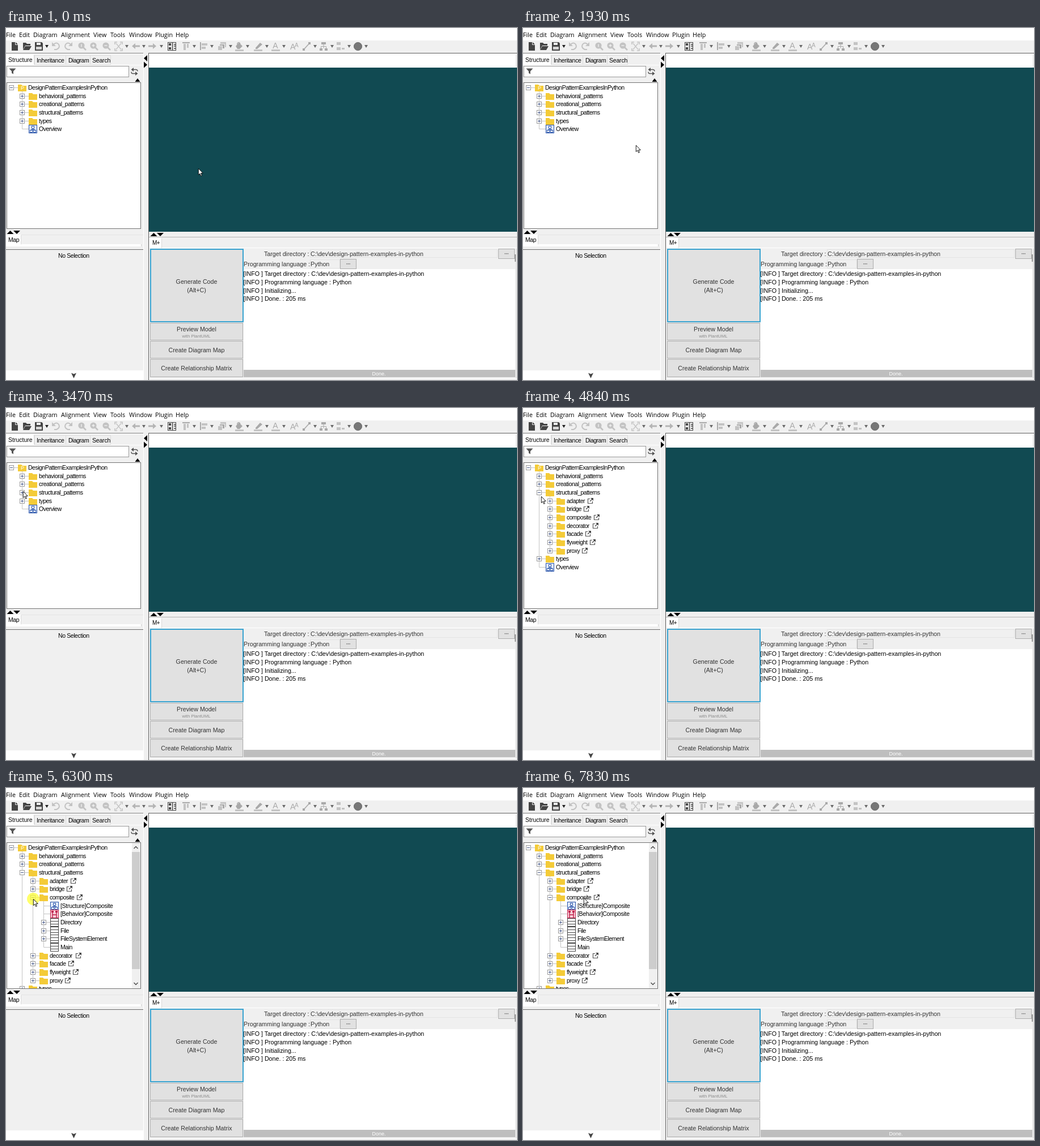
An HTML page for the animation above (8 s loop, 901x622 px).

```html
<!DOCTYPE html>
<html lang="en">
<head>
<meta charset="utf-8">
<title>Model browser</title>
<style>
  html, body { margin: 0; width: 100%; height: 100%; overflow: hidden; background: #f0f0f0; }
  svg { display: block; width: 901px; height: 622px; }
  text { font-family: "Liberation Sans", Arial, sans-serif; white-space: pre; }
  .menu { font-family: "Open Sans", "Noto Sans", sans-serif; }
</style>
</head>
<body>
<svg id="stage" viewBox="0 0 901 622" xmlns="http://www.w3.org/2000/svg"></svg>
<script>
const LOOP = 8000;
const ROW = 14.67;

// ---- drawing helpers: each returns SVG markup ----
const rect = (x, y, w, h, fill) => `<rect x="${x}" y="${y}" width="${w}" height="${h}" fill="${fill}"/>`;
const frame = (x, y, w, h, fill, edge) =>
  `<rect x="${x + .5}" y="${y + .5}" width="${w - 1}" height="${h - 1}" fill="${fill}" stroke="${edge}"/>`;
const shape = (d, fill) => `<path d="${d}" fill="${fill}"/>`;
const line = (d, color, w = 1) => `<path d="${d}" fill="none" stroke="${color}" stroke-width="${w}"/>`;
const disc = (x, y, r, fill) => `<circle cx="${x}" cy="${y}" r="${r}" fill="${fill}"/>`;
const ring = (x, y, r, color, w) =>
  `<circle cx="${x}" cy="${y}" r="${r}" fill="none" stroke="${color}" stroke-width="${w}"/>`;
const at = (x, y, body) => `<g transform="translate(${x} ${y})">${body}</g>`;

// y is the middle of the capitals
function label(x, y, s, { size = 10.5, gap = 0, fill = '#000', anchor = 'start', cls = '' } = {}) {
  return `<text x="${x}" y="${y + size * .355}" font-size="${size}" letter-spacing="${gap}"` +
    ` fill="${fill}" text-anchor="${anchor}" class="${cls}">${s}</text>`;
}
const caret = (x, y, fill = '#6a6a6a') => shape(`M${x - 3} ${y - 2.5}h6l-3 5z`, fill);
const upMark = (x, y, w = 6) => shape(`M${x - w} ${y + 3}h${2 * w}l${-w} -6z`, '#000');
const downMark = (x, y, w = 6) => shape(`M${x - w} ${y - 3}h${2 * w}l${-w} 6z`, '#000');

// ---- menu and toolbar ----
function menuBar() {
  const items = [[0, 'File'], [23, 'Edit'], [48, 'Diagram'], [97, 'Alignment'], [154, 'View'],
    [184, 'Tools'], [217, 'Window'], [263, 'Plugin'], [299, 'Help']];
  return rect(0, 0, 901, 22, '#fff') +
    items.map(([x, s]) => label(x, 11.7, s, { size: 10.75, cls: 'menu' })).join('');
}

function toolbar() {
  const dark = '#444', soft = '#c3c3c3', mid = '#a9a9a9', back = '#f0f0f0';
  const lens = (x, mark) => disc(x - 1, 31, 5.6, soft) + line(`M${x + 2.5} 34.5l4.5 4.5`, soft, 2.6) +
    line(mark, back, 1.4);
  const arrow = (x, s) => shape(`M${x - 7 * s} 32l${6 * s} -5v3.5h${8 * s}v3h${-8 * s}v3.5z`, '#b5b5b5');
  const turn = (x, s) => line(`M${x - 4 * s} 29q${5 * s} -5 ${9 * s} 0q${3 * s} 6 ${-4 * s} 9h${-4 * s}`, soft, 2) +
    shape(`M${x - 7 * s} 25v7h${7 * s}z`, soft);
  let s = rect(0, 22, 901, 22, back);
  s += shape('M10 25h7l4 4v11h-11z', dark) + line('M16.5 25v4.5h4.5', back);
  s += shape('M30 26h5l2 2h6v3h-9l-4 7z', dark) + shape('M34 32h11l-4 7h-11z', dark);
  s += shape('M51 25h12l2 2v13h-14z', dark) + rect(54, 26, 7, 4, back) + rect(53, 33, 10, 5, '#d5d5d5');
  s += turn(88, 1) + turn(110, -1);
  s += lens(134, 'M133 28.5v5') + lens(155, 'M151.5 31h5M154 28.5v5') + lens(177, 'M173.5 31h5');
  s += line('M192 29v-4h4M201 25h4v4M205 36v4h-4M196 40h-4v-4', soft, 1.6) +
    line('M194 27l9 11M203 27l-9 11', soft, 1.2);
  s += arrow(229, 1) + arrow(258, -1);
  s += frame(285, 25, 15, 15, back, dark) + rect(287, 27, 4, 4, dark) + rect(287, 34, 4, 4, dark) +
    line('M293.5 26v13M296 29h3M296 32h3M296 36h3', dark, 1.4);
  s += rect(311, 25, 13, 2, mid) + rect(313, 28, 4, 11, soft) + rect(319, 28, 3, 7, soft);
  s += rect(342, 25, 2, 14, mid) + rect(345, 27, 10, 4, soft) + rect(345, 33, 7, 4, soft);
  s += rect(378, 25, 10, 9, soft) + frame(376, 28, 10, 9, mid, back) + frame(373, 31, 9, 9, soft, back);
  s += shape('M405 32l6 -6l6 6l-5 5h-4z', mid) + line('M408 30v-3q3 -3 5 1', mid, 1.4) + rect(404, 38, 15, 3, soft);
  s += shape('M440 35l8 -9l4 3l-9 8h-3z', mid) + rect(437, 38, 15, 3, soft);
  s += label(475, 31, 'A', { size: 14, fill: mid, anchor: 'middle' }) + rect(468, 38, 15, 3, soft);
  s += label(501, 33, 'A', { size: 14, fill: mid }) + label(509, 30, 'A', { size: 10, fill: mid });
  s += line('M525 38l10 -11', mid, 1.6) + rect(523, 36, 4, 4, mid) + rect(533, 25, 4, 4, mid);
  s += rect(556, 25, 8, 4, mid) + line('M560 29v7M555.5 36v-3.5h9v3.5', mid) +
    rect(553, 36, 5, 4, mid) + rect(562, 36, 5, 4, mid);
  s += rect(583, 25, 7, 5, soft) + rect(583, 34, 7, 5, soft) + rect(592, 35, 5, 3, soft);
  s += disc(620.5, 32.5, 7, '#777') + ring(620.5, 32.5, 7, '#666', 1);
  s += caret(72, 32.5, '#222');
  for (const x of [213, 243, 274, 332, 363, 396, 426, 460, 490, 545, 575, 605, 635]) s += caret(x, 32.5);
  return s;
}

// ---- left side ----
function leftPane() {
  let s = rect(0, 44, 242, 1, '#808080') + rect(0, 45, 242, 1, '#fff');
  s += rect(0, 46, 50, 20, '#fff') + rect(49, 47, 1, 18, '#d9d9d9');
  s += frame(50, 48, 56, 17, '#f0f0f0', '#dcdcdc') + frame(105, 48, 44, 17, '#f0f0f0', '#dcdcdc') +
    frame(148, 48, 37, 17, '#f0f0f0', '#dcdcdc') + rect(50, 65, 192, 1, '#fff');
  s += label(4, 56, 'Structure') + label(54, 57, 'Inheritance', { gap: -.3 }) +
    label(110, 57, 'Diagram', { gap: -.5 }) + label(152, 57, 'Search', { gap: -.2 });
  s += frame(1, 67, 216, 20, '#fff', '#9a9a9a') + shape('M5.5 71.5h12l-4.5 5v5l-3 -2v-3z', '#555');
  s += line('M222 73.5h7M223 80.5h8', '#555', 1.6) + shape('M225 70v7l-4.5 -3.5zM228 77v7l4.5 -3.5z', '#555') +
    line('M229 73.5q3 0 3 3M223 80.5q-2 0 -2 -3', '#555', 1.4);
  s += upMark(232, 92, 4.5);
  s += frame(1, 96, 237, 259, '#fff', '#737373');
  s += upMark(7.5, 361) + downMark(19, 361);
  s += rect(0, 365, 26, 18, '#fff') + rect(26, 366, 1, 16, '#d9d9d9') + rect(27, 365, 215, 1, '#e4e4e4') +
    rect(27, 382, 212, 1, '#fff') + rect(0, 383, 239, 3, '#fff') + rect(238, 382, 1, 4, '#d0d0d0');
  s += label(4, 374, 'Map', { gap: -.4 });
  s += rect(0, 391, 242, 1, '#6b6b6b') + label(92, 402, 'No Selection', { gap: -.4 });
  s += rect(0, 605, 242, 17, '#fff') + shape('M115 609.5l4.5 2l4.5 -2l-4.5 9.5z', '#444');
  s += rect(242, 45, 1, 577, '#fff') + rect(243, 44, 8, 578, '#f0f0f0');
  s += shape('M249 48v11l-6 -5.5z', '#000') + shape('M243 59.5v11l6 -5.5z', '#000');
  return s;
}

// ---- right side ----
function rightPane() {
  const log = { size: 10.7 }, field = { size: 10.7, fill: '#333' };
  const caption = { size: 10.65, anchor: 'middle', fill: '#333' };
  const push = (y, h, s, dy = 0) => frame(254, y, 164, h, '#e1e1e1', '#adadad') +
    label(336, y + h / 2 + dy, s, caption);
  const dots = (x, y, w, h) => frame(x, y, w, h, '#e1e1e1', '#adadad') +
    [-2.5, 0, 2.5].map(d => rect(x + w / 2 + d - .6, y + h / 2 - .8, 1.2, 1.2, '#333')).join('');
  const folder = 'C:\\dev\\design-pattern-examples-in-python';
  let s = rect(251, 44, 650, 1, '#5f5f5f') + rect(251, 44, 1, 578, '#5f5f5f') + rect(252, 45, 649, 25, '#fff');
  s += rect(899, 46, 1, 24, '#ddd') + rect(252, 70, 649, 290, '#114a52');
  s += upMark(260.5, 365) + downMark(272, 365);
  s += rect(252, 369, 649, 1, '#b5b5b5') + rect(253, 370, 22, 19, '#fff') + rect(274, 371, 1, 18, '#d9d9d9') +
    rect(275, 388, 626, 1, '#fff') + label(258, 379, 'M+', { size: 10, gap: -.5 });
  s += rect(254, 390, 165, 130, '#38a3d0') + rect(256, 392, 161, 126, '#e1e1e1');
  s += label(336, 448, 'Generate Code', caption) + label(336, 463, '(Alt+C)', caption);
  s += push(521, 31, 'Preview Model', -4.5) +
    label(335.5, 544.5, 'with PlantUML', { size: 7.75, anchor: 'middle', fill: '#8c8c8c' });
  s += push(553, 31, 'Create Diagram Map', .5) + push(585, 32, 'Create Relationship Matrix', .5);
  s += frame(536, 391, 331, 15, '#f0f0f0', '#e3e3e3') + frame(536, 409, 53, 16, '#f0f0f0', '#e3e3e3');
  s += label(455, 399, 'Target directory :', field) + label(419, 417.5, 'Programming language :', field);
  s += label(537, 399, folder, field) + label(537, 417.5, 'Python', field);
  s += dots(868, 390, 29, 18) + dots(589, 408, 29, 18) + rect(897, 400, 2, 13, '#9c9c9c');
  s += rect(419, 426, 479, 178, '#fff');
  ['Target directory : ' + folder, 'Programming language : Python', 'Initializing...', 'Done. : 205 ms']
    .forEach((m, i) => s += label(418.5, 434.5 + i * ROW, '[INFO ] ' + m, log));
  s += rect(419, 604, 479, 13, '#bebebe') +
    label(657.5, 611, 'Done.', { size: 9, anchor: 'middle', fill: '#fff' });
  return s + rect(252, 619, 649, 1, '#fff') + rect(899, 390, 1, 229, '#dcdcdc');
}

// ---- tree ----
const blue = '#2450a8', red = '#c01f4a';
const icons = {
  root: x => icons.folder(x) + label(x + 8, 1, 'P', { size: 9, fill: '#fff', anchor: 'middle' }),
  folder: x => shape(`M${x} -5h6l2 2h7v10h-15z`, '#f4cb38'),
  blue: x => frame(x, -7, 15, 15, '#e6eefc', blue) + frame(x + 5, -5, 5, 5, '#fff', blue) +
    line(`M${x + 7.5} 0v2M${x + 4.5} 3v-1.5h6v1.5`, blue) +
    frame(x + 2, 2, 5, 5, '#fff', blue) + frame(x + 8, 2, 5, 5, '#fff', blue),
  red: x => frame(x, -7, 15, 15, '#f6cfd8', red) + rect(x + 2, -5, 4, 3, red) +
    rect(x + 9, -5, 4, 3, red) + line(`M${x + 4} -2v9M${x + 11} -2v9M${x + 4} 2h7`, red, 1.4),
  box: x => frame(x, -7, 15, 15, '#fff', '#444') + line(`M${x} -1.5h15M${x} 3.5h15`, '#444'),
};
const outLink = x => line(`M${x + 4} -3.5h-3.5v8h8v-3.5`, '#555', 1.2) +
  line(`M${x + 4} 1l4.5 -4.5`, '#444', 1.3) + shape(`M${x + 5} -5h5v5z`, '#444');

// [depth, text, icon, expander, link x]
const kid = (s, x, sign = '+') => [2, s, 'folder', sign, x];
const head = [[0, 'DesignPatternExamplesInPython', 'root', '-'], [1, 'behavioral_patterns', 'folder', '+'],
  [1, 'creational_patterns', 'folder', '+']];
const tail = [[1, 'types', 'folder', '+'], [1, 'Overview', 'blue', '']];
const group = sign => [1, 'structural_patterns', 'folder', sign];
const before = [kid('adapter', 114), kid('bridge', 107)];
const after = [kid('decorator', 123), kid('facade', 110), kid('flyweight', 118), kid('proxy', 104)];
const parts = [[3, '[Structure]Composite', 'blue', ''], [3, '[Behavior]Composite', 'red', ''],
  [3, 'Directory', 'box', '+'], [3, 'File', 'box', '+'], [3, 'FileSystemElement', 'box', '+'], [3, 'Main', 'box', '']];
const trees = [
  [...head, group('+'), ...tail],
  [...head, group('-'), ...before, kid('composite', 125), ...after, ...tail],
  [...head, group('-'), ...before, kid('composite', 125, '-'), ...parts, ...after, ...tail],
];

function tree(rows) {
  const guide = '#c4c4c4';
  let guides = '', s = '';
  rows.forEach(([depth, text, icon, sign, link], i) => {
    const x = Math.round(9 + depth * 18.9), y = Math.round(105 + i * ROW);
    if (depth) {
      let up = i - 1;
      while (rows[up][0] >= depth) up--;
      guides += line(`M${x + .5} ${Math.round(105 + up * ROW) + 7}V${y + .5}`, guide);
    }
    guides += line(`M${x + .5} ${y + .5}h12`, guide);
    let body = icons[icon](x + 12);
    if (sign) {
      body += frame(x - 4, -4, 9, 9, '#fff', '#9a9a9a') +
        line(`M${x - 2} .5h5` + (sign === '+' ? `M${x + .5} -2v5` : ''), '#4a5c8c');
    }
    body += label(x + 30, .3, text, { gap: text[0] === '[' ? -.3 : -.5 });
    if (link) body += outLink(link);
    s += at(0, y, body);
  });
  return guides + s;
}

const scrollBar = rect(222, 97, 15, 257, '#f0f0f0') + rect(222, 113, 14, 207, '#cdcdcd') +
  line('M225.5 107l3.5 -3.5l3.5 3.5M225.5 344l3.5 3.5l3.5 -3.5', '#505050', 1.5);

document.getElementById('stage').innerHTML =
  '<clipPath id="clip"><rect x="2" y="97" width="235" height="257"/></clipPath>' +
  rect(0, 0, 901, 622, '#f0f0f0') + menuBar() + toolbar() + leftPane() + rightPane() +
  trees.map((rows, i) => `<g class="tree" clip-path="url(#clip)">${tree(rows)}${i === 2 ? scrollBar : ''}</g>`).join('') +
  '<circle id="click" r="11" fill="#ffff30" opacity=".72"/>' +
  '<path id="pointer" d="M.3 .3V11.6L2.9 9.2L4.7 13.5L6.5 12.7L4.7 8.6H8.3Z"' +
  ' fill="#fff" stroke="#000" stroke-width=".9"/>';

// ---- motion ----
const path = [[0, 339, 248], [923, 339, 248], [1390, 302, 239], [1770, 227, 217], [2560, 93, 165],
  [2640, 78, 160], [3470, 30, 147], [4760, 30, 147], [4840, 32, 156], [5600, 45, 189], [5840, 48, 196],
  [6753, 48, 196], [7600, 105, 194], [7673, 105, 194], [7830, 107, 194], [LOOP, 107, 194]];
const starts = [1000, 4840, 6830, 7750];
const clicks = [[4030, 4130], [6300, 6370]];
const TICK = 77.2;

// the pointer is sampled on a coarse clock, restarted with each move
function sampled(t) {
  const s = starts.filter(v => v <= t).pop();
  return s === undefined ? 0 : Math.min(LOOP, s + Math.floor((t - s) / TICK + .15) * TICK);
}

function slope(i, k) {
  if (i === 0 || i === path.length - 1) return 0;
  const [a, b, c] = path.slice(i - 1, i + 2);
  const h0 = b[0] - a[0], h1 = c[0] - b[0];
  const d0 = (b[k] - a[k]) / h0, d1 = (c[k] - b[k]) / h1;
  return d0 * d1 <= 0 ? 0 : (d0 * h1 + d1 * h0) / (h0 + h1);
}

function along(t, k) {
  let i = 0;
  while (i < path.length - 2 && path[i + 1][0] <= t) i++;
  const a = path[i], b = path[i + 1], h = b[0] - a[0], u = (t - a[0]) / h, v = 1 - u;
  return Math.round(a[k] * (1 + 2 * u) * v * v + b[k] * u * u * (3 - 2 * u) +
    h * u * v * (slope(i, k) * v - slope(i + 1, k) * u));
}

const layers = document.querySelectorAll('.tree');
const pointer = document.getElementById('pointer');
const click = document.getElementById('click');

function draw() {
  const t = performance.now() % LOOP, q = sampled(t);
  const move = `translate(${along(q, 1)} ${along(q, 2)})`;
  const open = clicks.filter(c => t >= c[0]).length;
  layers.forEach((g, i) => g.style.display = i === open ? '' : 'none');
  pointer.setAttribute('transform', move);
  click.setAttribute('transform', move);
  click.style.display = clicks.some(([a, b]) => t >= a && t < b) ? '' : 'none';
  requestAnimationFrame(draw);
}
draw();
</script>
</body>
</html>
```
